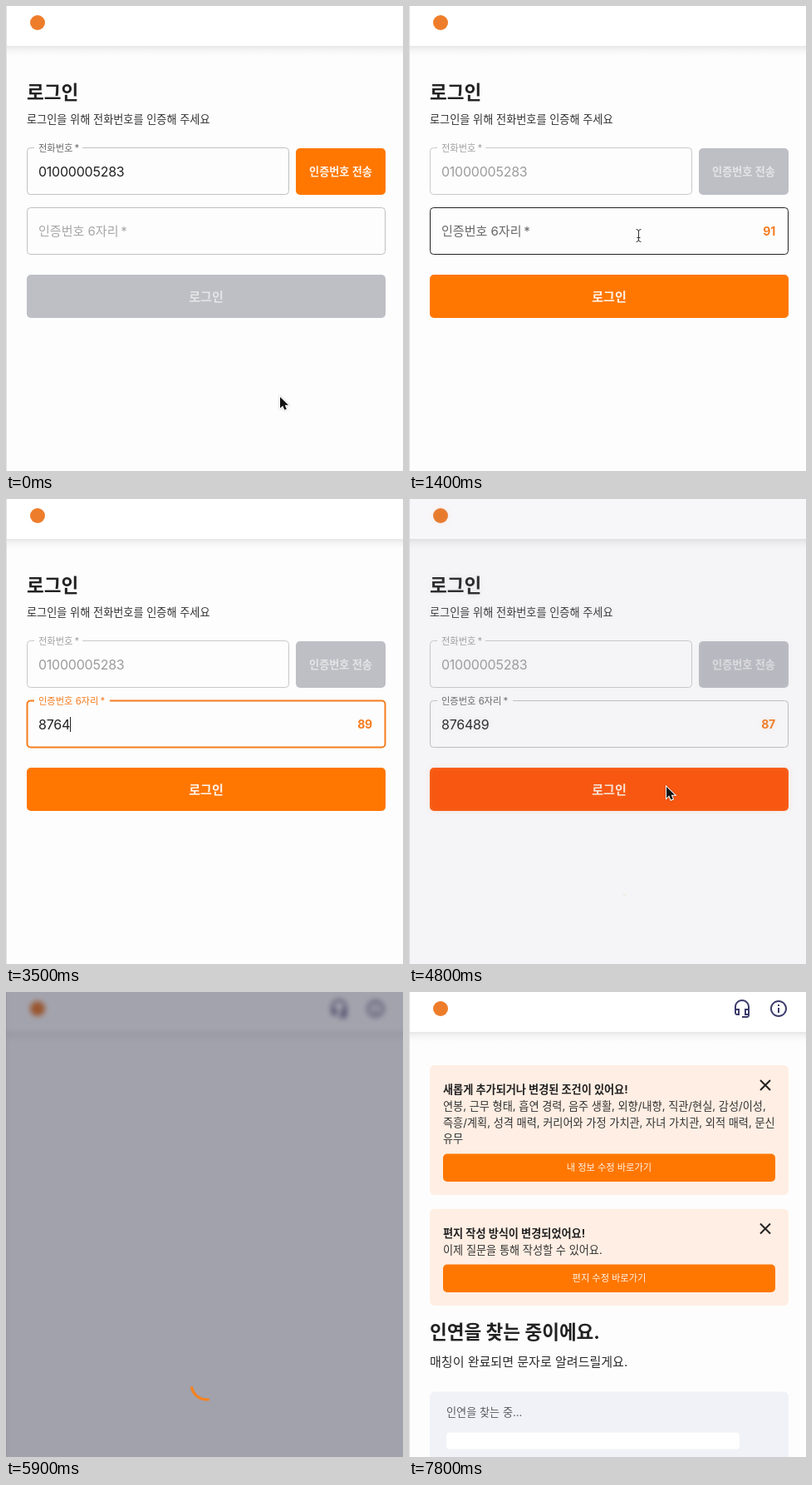
These frames come from a looping animation (478 px wide and 559 px high, 8.7 s). An HTML page with a canvas:

```html
<!DOCTYPE html>
<html lang="ko">
<head>
<meta charset="utf-8">
<title>로그인</title>
<style>
html, body { margin: 0; width: 100%; height: 100%; overflow: hidden; background: #fdfdfd; }
canvas { display: block; width: 478px; height: 559px; }
</style>
</head>
<body>
<canvas id="stage"></canvas>
<script>
const W = 478, H = 559, LOOP = 8700;
const DPR = window.devicePixelRatio || 1;
const FONT = 'Inter, "Noto Sans CJK KR", "Noto Sans CJK JP", sans-serif';
const HANGUL = 0.94; // Hangul is set a little smaller than the digits
const BG = '#fdfdfd', ORANGE = '#ff7700', ACCENT = '#f57c1f', INK = '#222222';
const OFF = '#bebfc5', OFF_TEXT = '#e4e4e7', NAVY = '#3c3b6c';

const PHONE = '01000005283';
const CODE = '876489';
const KEYS = [2600, 3000, 3300, 3500, 3600, 3800];
const SENT = 800, FOCUS = 1600, SUBMIT = 4760, HOME = 5640, READY = 6040, NOTICE = 6560;
const LOADERS = [[250, 1000], [SUBMIT, 6050]];

const HEADSET = new Path2D('M12 1c-4.97 0-9 4.03-9 9v7c0 1.66 1.34 3 3 3h3v-8H5v-2c0-3.87 3.13-7 7-7s7 3.13 7 7v2h-4v8h4v1h-7v2h6c1.66 0 3-1.34 3-3V10c0-4.97-4.03-9-9-9zM7 14v4H6c-.55 0-1-.45-1-1v-3h2zm12 4h-2v-4h2v4z');
const INFO = new Path2D('M11 7h2v2h-2zm0 4h2v6h-2zm1-9C6.48 2 2 6.48 2 12s4.48 10 10 10 10-4.48 10-10S17.52 2 12 2zm0 18c-4.41 0-8-3.59-8-8s3.59-8 8-8 8 3.59 8 8-3.59 8-8 8z');
const HOUSE = new Path2D('M55 329L59 332.600V330.500H61.300V334.700L63.300 336.500 62.200 338H61V344.500H49V338H47.800L46.700 336.500Z');
const ARROW = new Path2D('M0 0V13.500L3.200 10.600 5.400 15.600 7.800 14.600 5.700 9.700H10z');

function makeLayer(canvas) {
  canvas.width = W * DPR;
  canvas.height = H * DPR;
  const c = canvas.getContext('2d');
  c.scale(DPR, DPR);
  return c;
}
const stage = document.getElementById('stage');
const page = document.createElement('canvas');
const ctx = makeLayer(stage), g = makeLayer(page);

const ramp = (t, a, b) => Math.min(1, Math.max(0, (t - a) / (b - a)));
const smooth = k => k * k * (3 - 2 * k);
const lerp = (a, b, k) => a + (b - a) * k;

// y is the visual middle of the line
function text(str, x, y, size, color, weight = 400, align = 'left') {
  const digits = /^\d+$/.test(str);
  const px = digits ? size : size * HANGUL;
  g.font = `${weight} ${px}px ${FONT}`;
  g.letterSpacing = (digits ? -0.015 * px : 0) + 'px';
  g.textAlign = align;
  g.fillStyle = color;
  g.fillText(str, x, y + px * 0.375);
  return g.measureText(str).width;
}

function box(x, y, w, h, r, color) {
  g.beginPath();
  g.roundRect(x, y, w, h, r);
  g.fillStyle = color;
  g.fill();
}

function button(label, x, y, w, h, size, fill = ORANGE, color = '#fff3e8', weight = 600) {
  box(x, y, w, h, 5, fill);
  text(label, x + w / 2, y + h / 2, size, color, weight, 'center');
}

// outlined field with a notch in its top edge
function outline(y, w, color, line, notch) {
  g.beginPath();
  g.roundRect(25.5, y + 0.5, w - 1, 56, 4);
  g.strokeStyle = color;
  g.lineWidth = line;
  g.stroke();
  if (notch) {
    g.fillStyle = BG;
    g.fillRect(34, y - 1, notch, 4);
  }
}

function icon(path, x, y) {
  g.save();
  g.translate(x, y);
  g.fillStyle = NAVY;
  g.fill(path);
  g.restore();
}

function drawHeader(home) {
  const shade = g.createLinearGradient(0, 48, 0, 60);
  shade.addColorStop(0, 'rgba(0,0,0,.09)');
  shade.addColorStop(0.4, 'rgba(0,0,0,.035)');
  shade.addColorStop(1, 'rgba(0,0,0,0)');
  g.fillStyle = shade;
  g.fillRect(0, 48, W, 12);
  g.fillStyle = '#ffffff';
  g.fillRect(0, 0, W, 48);
  box(29, 11, 18, 18, 9, '#ee7d2b');
  if (home) {
    icon(HEADSET, 389, 8);
    icon(INFO, 433, 8);
  }
}

function drawLogin(t) {
  const sent = t >= SENT;
  const focused = t >= FOCUS && t < SUBMIT - 20;
  const lift = smooth(ramp(t, FOCUS, FOCUS + 200));

  text('로그인', 25, 103.5, 24, INK, 700);
  text('로그인을 위해 전화번호를 인증해 주세요', 25, 136, 14, '#333333');

  outline(170, 316, sent ? '#c9c9c9' : '#c0c0c0', 1, 58);
  text('전화번호\u2009*', 39, 170.5, 12, sent ? '#a0a0a0' : '#6a6a6a');
  text(PHONE, 39, 199, 16, sent ? '#9c9c9c' : INK);
  button('인증번호 전송', 349, 171, 108, 56, 14, sent ? OFF : ORANGE, sent ? OFF_TEXT : '#fff3e8');

  const hover = t >= 1200 && t < FOCUS;
  const edge = focused ? ACCENT : hover ? INK : '#c0c0c0';
  outline(242, 432, edge, focused ? 2 : 1, 91 * lift);
  text('인증번호 6자리\u2009*', 39, lerp(270, 242.5, lift), lerp(16, 12, lift),
    focused ? ACCENT : sent ? '#666666' : '#a6a6a6');

  const typed = CODE.slice(0, KEYS.filter(k => t >= k).length);
  const end = 39 + (typed ? text(typed, 39, 271, 16, INK) : 0);
  const last = KEYS.filter(k => t >= k).pop() || FOCUS;
  if (focused && (t - last) % 1000 < 500) {
    g.fillStyle = INK;
    g.fillRect(Math.round(end), 262, 1, 18);
  }
  if (sent) {
    const left = 91 - Math.floor((t - SENT) / 1000);
    text(String(left), 441, 270.5, 14, ACCENT, 700, 'right');
  }

  const over = t > 4550;
  button('로그인', 25, 323, 432, 52, 16, !sent ? OFF : over ? '#ff5a0f' : ORANGE, sent ? '#fff3e8' : OFF_TEXT);
}

function drawSearch(shift) {
  g.save();
  g.translate(0, shift);
  text('인연을 찾는 중이에요.', 25, 135, 24, INK, 700);
  text('매칭이 완료되면 문자로 알려드릴게요.', 25, 170.5, 16, '#2b2b2b');
  box(25, 207, 432, 183, 6, '#f1f2f8');
  text('인연을 찾는 중...', 45, 231.5, 14, '#5c5c62');
  box(45, 256, 353, 20, 4, '#ffffff');
  [222, 171, 139].forEach((w, i) => box(73, 297 + 32 * i, w, 16, 1, '#ffffff'));

  const dark = '#2f2f36', gap = '#b4b5bd';
  // suitcase
  box(47, 299.5, 16, 12.5, 2, dark);
  g.strokeStyle = dark;
  g.lineWidth = 1.6;
  g.strokeRect(52, 298, 6, 3);
  g.fillStyle = gap;
  g.fillRect(50, 299.5, 0.9, 12.5);
  g.fillRect(59.1, 299.5, 0.9, 12.5);
  // house
  g.fillStyle = dark;
  g.fill(HOUSE);
  // cake
  box(54.1, 361, 1.8, 5, 0.8, dark);
  box(49, 365.5, 12, 4, 1.5, dark);
  box(47.5, 368.5, 15, 5.5, 1.5, dark);
  box(47, 373.5, 16, 3, 1, dark);
  g.beginPath();
  for (let x = 48; x <= 62; x += 0.5) g.lineTo(x, 372 + Math.sin(x * 1.35) * 0.8);
  g.strokeStyle = gap;
  g.lineWidth = 1;
  g.stroke();
  g.restore();
}

function drawNotice(y, h, open, lines, label) {
  g.save();
  g.globalAlpha = open;
  g.beginPath();
  g.rect(25, y, 432, h * open);
  g.clip();
  box(25, y, 432, h, 6, '#ffeee3');
  lines.forEach((s, i) => text(s, 41, y + 29.5 + i * 19.6, 14, i ? '#333333' : INK, i ? 400 : 700));
  g.beginPath();
  for (const d of [-6, 6]) {
    g.moveTo(429 - d, y + 24 - 6);
    g.lineTo(429 + d, y + 24 + 6);
  }
  g.strokeStyle = INK;
  g.lineWidth = 2;
  g.stroke();
  button(label, 41, y + h - 49.5, 400, 33.5, 12, ORANGE, '#fff3e8', 500);
  g.restore();
}

function drawHome(t) {
  if (t < READY) return;
  const k = ramp(t, NOTICE, 7800);
  const open = 1 - Math.pow(1 - k, 4);
  if (open > 0) {
    drawNotice(88, 156, open, [
      '새롭게 추가되거나 변경된 조건이 있어요!',
      '연봉, 근무 형태, 흡연 경력, 음주 생활, 외향/내향, 직관/현실, 감성/이성,',
      '즉흥/계획, 성격 매력, 커리어와 가정 가치관, 자녀 가치관, 외적 매력, 문신',
      '유무'
    ], '내 정보 수정 바로가기');
    drawNotice(88 + 172.5 * open, 116.5, open, [
      '편지 작성 방식이 변경되었어요!',
      '이제 질문을 통해 작성할 수 있어요.'
    ], '편지 수정 바로가기');
  }
  drawSearch(273.5 * open);
}

function drawSpinner(age, alpha) {
  const p = (age / 1400) % 1, grow = p < 0.5, e = smooth((p * 2) % 1);
  const from = grow ? 15 * e : 15 + 110 * e;
  const to = Math.min(126.9, from + (grow ? 1 + 99 * e : 100));
  const angle = d => (p + d / 126.9) * Math.PI * 2;
  ctx.globalAlpha = alpha;
  ctx.beginPath();
  ctx.arc(241.5, 471.5, 18.4, angle(from), angle(to));
  ctx.strokeStyle = '#f58220';
  ctx.lineWidth = 3.3;
  ctx.stroke();
  ctx.globalAlpha = 1;
}

function drawLoader(t) {
  for (const [start, end] of LOADERS) {
    const a = smooth(ramp(t, start, start + 225)) * (1 - smooth(ramp(t, end, end + 200)));
    if (a <= 0) continue;
    ctx.globalAlpha = a;
    ctx.filter = `blur(${3 * DPR}px)`;
    ctx.drawImage(page, 0, 0, W, H);
    ctx.filter = 'none';
    ctx.fillStyle = 'rgba(27,25,52,.4)';
    ctx.fillRect(0, 0, W, H);
    drawSpinner(t - (t >= HOME ? HOME : start), a);
  }
}

// pointer stops: [leave, arrive, x, y]
const MOVES = [[0, 240, 400, 203], [850, 1300, 276, 276], [4300, 4640, 310, 346], [5520, 5850, 425, -20]];

function drawPointer(t) {
  if ((t >= KEYS[0] && t < 4300) || t > 5850) return;
  let x = 330, y = 470;
  for (const [a, b, tx, ty] of MOVES) {
    const k = smooth(ramp(t, a, b));
    x = lerp(x, tx, k);
    y = lerp(y, ty, k);
  }
  const beam = t > 1150 && t < SUBMIT && y > 242 && y < 299;
  ctx.save();
  ctx.translate(x, y);
  if (beam) {
    ctx.strokeStyle = '#333333';
    ctx.lineWidth = 1;
    ctx.beginPath();
    for (const s of [-1, 1]) {
      ctx.moveTo(-2.5, 7.5 * s);
      ctx.quadraticCurveTo(0.5, 7.5 * s, 0.5, 5 * s);
      ctx.quadraticCurveTo(0.5, 7.5 * s, 3.5, 7.5 * s);
    }
    ctx.moveTo(0.5, -6);
    ctx.lineTo(0.5, 6);
    ctx.moveTo(-1.5, 2.5);
    ctx.lineTo(2.5, 2.5);
    ctx.stroke();
  } else {
    ctx.shadowColor = 'rgba(0,0,0,.3)';
    ctx.shadowBlur = 2;
    ctx.strokeStyle = '#ffffff';
    ctx.lineWidth = 2;
    ctx.stroke(ARROW);
    ctx.shadowColor = 'transparent';
    ctx.fillStyle = '#111111';
    ctx.fill(ARROW);
  }
  ctx.restore();
}

function render(t) {
  const home = t >= HOME;
  g.fillStyle = BG;
  g.fillRect(0, 0, W, H);
  drawHeader(home);
  if (home) drawHome(t); else drawLogin(t);
  g.fillStyle = '#e0e0e2';
  g.fillRect(0, 0, 1, H);

  ctx.drawImage(page, 0, 0, W, H);
  drawLoader(t);
  drawPointer(t);
}

const begin = performance.now();
function tick() {
  render((performance.now() - begin) % LOOP);
  requestAnimationFrame(tick);
}
tick();
</script>
</body>
</html>
```
